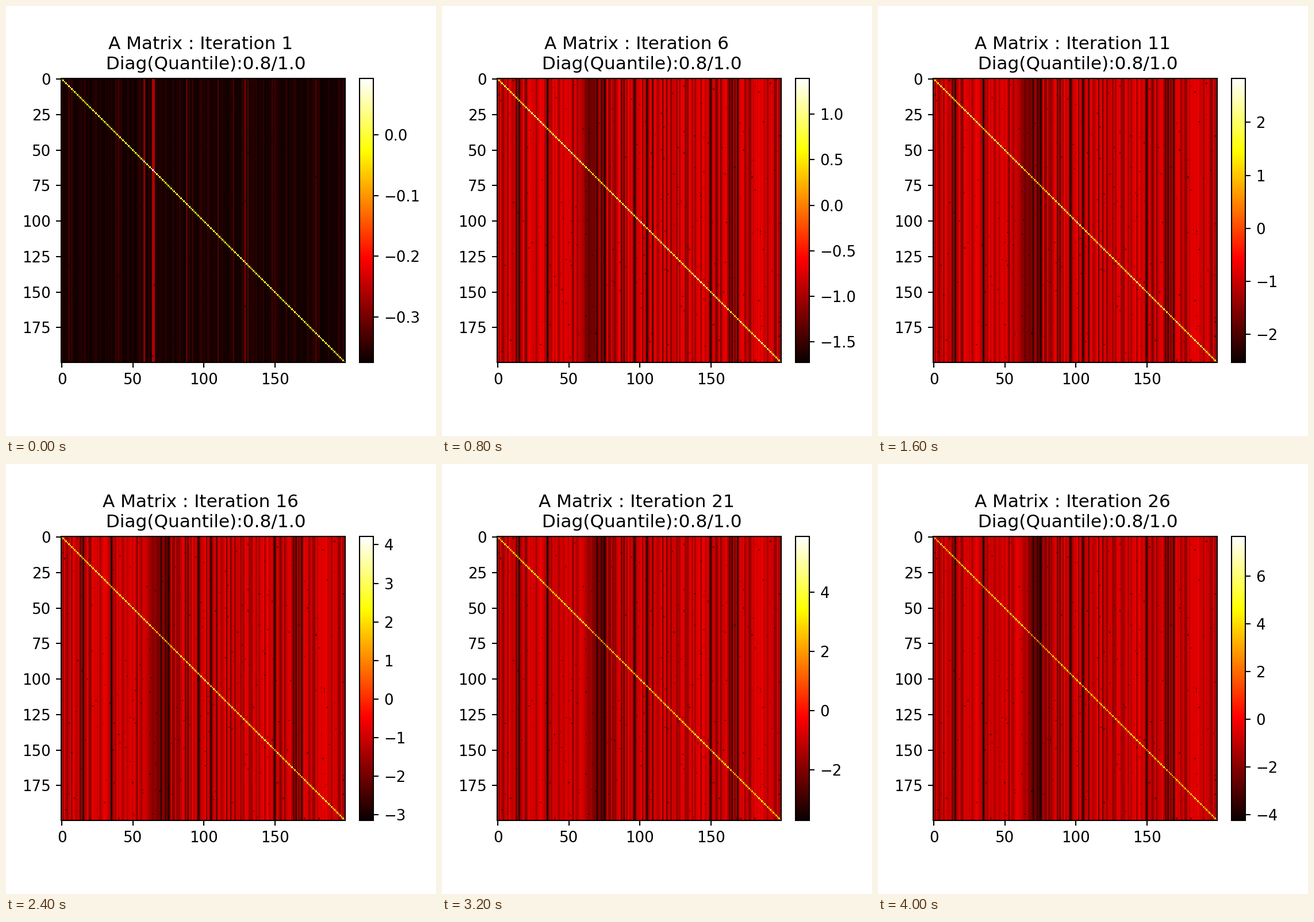
Recreate the animation shown at these times as a matplotlib script. Size 748x748 px, loop 4800 ms.

```python
import numpy as np
import matplotlib.pyplot as plt
from matplotlib.animation import FuncAnimation

SIZE, DPI, N, STEPS = 748, 187, 200, 6
# Ends of the colour scale at each step
LOW = [-0.3747, -1.724, -2.526, -3.150, -3.712, -4.229]
HIGH = [0.0927, 1.391, 2.827, 4.216, 5.887, 7.649]

rng = np.random.default_rng(7)
x = np.arange(N)


def dim_near(cols, centre, width, depth):
    return cols * (1 - depth * np.exp(-((x - centre) / width) ** 2))


# Column levels on a 0 to 1 scale: the first step, then an early and a late state
first = .008 + rng.exponential(.022, N)
first[[58, 64, 65, 129]] = .20, .26, .24, .20

early = np.clip(.345 - rng.exponential(.07, N), .1, .34)
late = np.clip(.75 * early + .25 * (.34 - rng.exponential(.08, N)), .1, .34)
early = dim_near(early, 65, 7, .5)
late = dim_near(late, 72, 6, .5)
for col in (15, 35, 70, 75, 96, 105, 150, 165, 169):
    early = dim_near(early, col, .8, .8)
    late = dim_near(late, col, .8, .8)

diag_noise = rng.normal(0, .04, N)
rows, columns = rng.integers(0, N, (2, 170))
fade = rng.uniform(.4, .9, 170)


def matrix(k):
    """Levels from 0 to 1 on the colour scale of step k."""
    if k == 0:
        cols, diag = first, first + .75
    else:
        t = (k - 1) / (STEPS - 2)
        cols = (1 - t) * early + t * late
        diag = .85 - .035 * k + .8 * (cols - .27) + diag_noise
    grid = np.tile(cols, (N, 1))
    grid[rows, columns] *= fade
    grid[columns, rows] *= fade
    np.fill_diagonal(grid, np.clip(diag, 0, 1))
    return grid


def box(x0, y0, x1, y1):
    return [x0 / SIZE, 1 - y1 / SIZE, (x1 - x0) / SIZE, (y1 - y0) / SIZE]


plt.rcParams["font.family"] = "DejaVu Sans"
fig = plt.figure(figsize=(SIZE / DPI, SIZE / DPI), dpi=DPI, facecolor="white")
ax = fig.add_axes(box(96.1, 126, 590, 620))
cax = fig.add_axes(box(614.7, 126, 639.4, 620))
im = ax.imshow(np.zeros((N, N)), cmap="hot", vmin=0, vmax=1,
               interpolation="nearest", aspect="auto")
ax.set_xticks(range(0, N, 50))
ax.set_yticks(range(0, N, 25))
fig.colorbar(im, cax=cax)
title = ax.set_title("", linespacing=1.3)


def draw(k):
    lo, hi = LOW[k], HIGH[k]
    im.set_data(lo + (hi - lo) * matrix(k))
    im.set_clim(lo, hi)
    title.set_text(f"A Matrix : Iteration {5 * k + 1} \n Diag(Quantile):0.8/1.0")
    return im, title


anim = FuncAnimation(fig, draw, frames=STEPS, interval=800, repeat=True,
                     repeat_delay=0, init_func=lambda: draw(0), blit=False)
plt.show()
```
